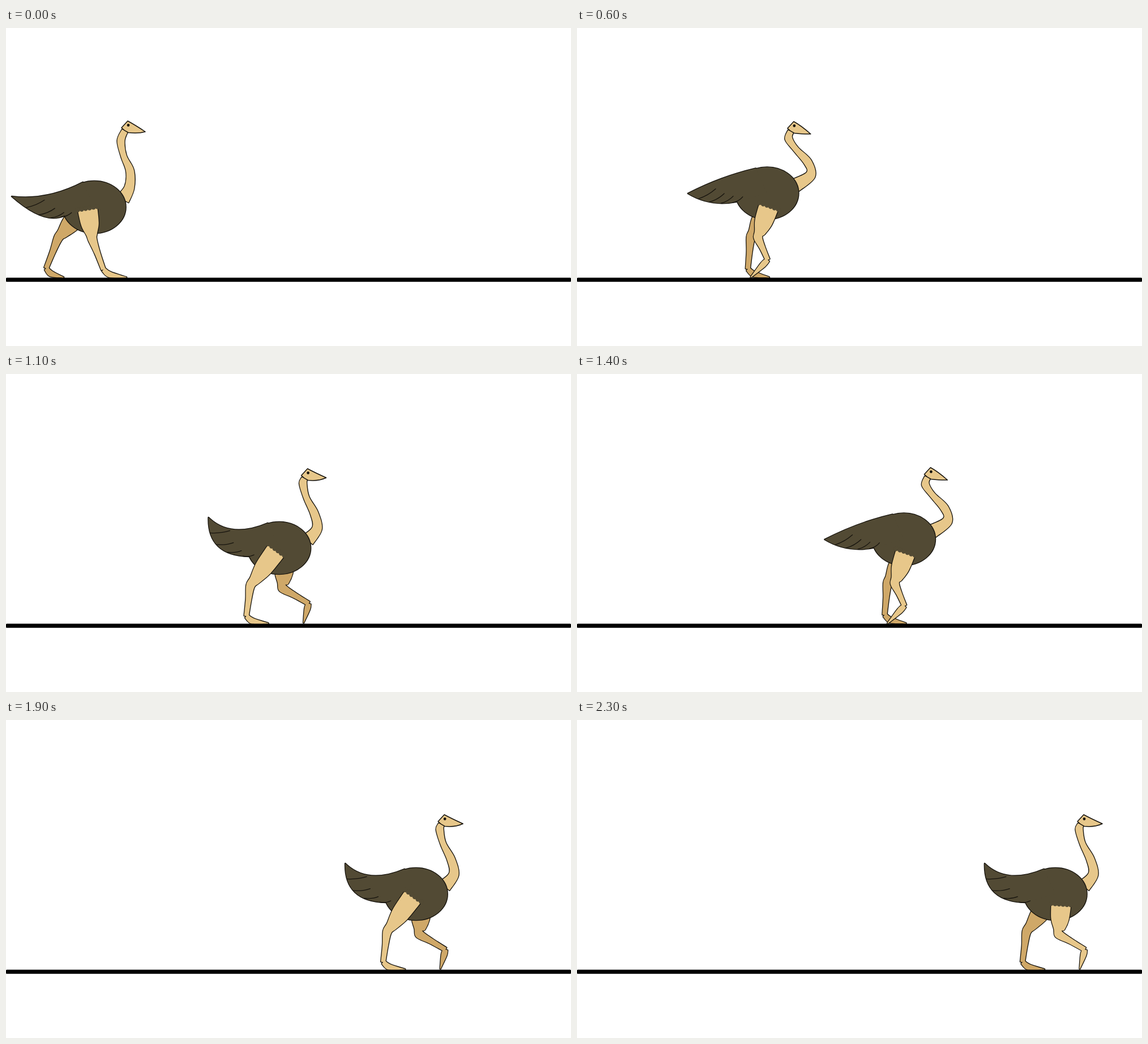
These frames come from a looping animation (998 by 561 pixels, 2.4 s). An HTML page:

```html
<!DOCTYPE html>
<html lang="en">
<head>
<meta charset="utf-8">
<title>Walking ostrich</title>
<style>
  html, body { margin: 0; width: 100%; height: 100%; overflow: hidden; background: #fff; }
  svg { display: block; width: 100vw; height: 100vh; }
  path { stroke-linecap: round; stroke-linejoin: round; }
</style>
</head>
<body>
<svg id="stage" viewBox="0 0 998 561"></svg>
<script>
const INK = '#17140e', SKIN = '#e7c78a', SHADE = '#cfa868', PLUME = '#524a34';
const FRAME = 100, FRAMES = 24, STRIDE = 120.8;
const BODY_RX = 55.5, BODY_RY = 46;
const NECK_WIDTHS = [11, 13, 10, 14, 17, 24];
const LEG_WIDTHS = [35, 31, 19, 15, 10, 8];
const FOOT_WIDTHS = [8, 10, 1];

// Joints: body centre; tail tip, upper and lower bend; crown and beak; neck bends;
// hip, knee, ankle and toe of each leg.
const contact = {
  body: [[156, 316]],
  tail: [[10, 297], [72, 305], [68, 348]],
  head: [[215, 164], [246, 183]],
  neck: [[203, 199], [208, 226], [219, 252], [218, 281]],
  front: [[144, 319], [153, 374], [172, 426], [213, 440]],
  rear: [[135, 321], [92, 371], [71, 424], [102, 440]]
};
const passing = {
  body: [[215, 291.5]],
  tail: [[75, 292], [133, 262], [115, 316]],
  head: [[262, 165], [292, 187]],
  neck: [[253, 195], [266, 214], [287, 237], [292, 259]],
  front: [[218, 315], [186, 370], [181, 425], [219, 440]],
  rear: [[218, 315], [199, 370], [216, 409], [186, 440]]
};
const high = {
  body: [[241, 307]],
  tail: [[116, 253], [155, 291], [114, 320]],
  head: [[291, 167], [324, 183]],
  neck: [[283, 193], [289, 218], [303, 246], [308, 272]],
  front: [[236, 311], [190, 374], [183, 427], [222, 440]],
  rear: [[251, 326], [247, 378], [293, 405], [284, 439]]
};

const lerp = (a, b, t) => [a[0] + (b[0] - a[0]) * t, a[1] + (b[1] - a[1]) * t];
const shift = (p, x, y) => [p[0] + x, p[1] + y];
const blend = (a, b) => Object.fromEntries(
  Object.keys(a).map(key => [key, a[key].map((p, i) => lerp(p, b[key][i], .5))]));

const poses = [contact, blend(contact, passing), passing, high];
const stage = document.getElementById('stage');

function add(parent, tag, attrs) {
  const el = document.createElementNS('http://www.w3.org/2000/svg', tag);
  for (const key in attrs) el.setAttribute(key, attrs[key]);
  return parent.appendChild(el);
}

// Smooth curve through points
function smooth(pts, start) {
  const at = i => pts[Math.max(0, Math.min(pts.length - 1, i))];
  const handle = (i, sign) => shift(at(i),
    sign * (at(i + 1)[0] - at(i - 1)[0]) / 6, sign * (at(i + 1)[1] - at(i - 1)[1]) / 6);
  let d = start + pts[0];
  for (let i = 1; i < pts.length; i++) d += `C${handle(i - 1, 1)} ${handle(i, -1)} ${pts[i]}`;
  return d;
}

// Points beside a spine, on the side given by the sign
function edge(spine, widths, sign) {
  return spine.map((p, i) => {
    const a = spine[Math.max(0, i - 1)], b = spine[Math.min(spine.length - 1, i + 1)];
    const dx = b[0] - a[0], dy = b[1] - a[1];
    const k = sign * widths[i] / 2 / Math.hypot(dx, dy);
    return shift(p, -dy * k, dx * k);
  });
}

const ribbon = (spine, widths) =>
  smooth(edge(spine, widths, 1), 'M') + smooth(edge(spine, widths, -1).reverse(), 'L') + 'Z';

// Several shapes with one common outline
function merged(g, shapes, fill) {
  shapes.forEach(d => add(g, 'path', { d, fill, stroke: INK, 'stroke-width': 2.6 }));
  shapes.forEach(d => add(g, 'path', { d, fill }));
}

function drawLeg(g, [hip, knee, ankle, toe], near) {
  const spine = [hip, lerp(hip, knee, .5), lerp(hip, knee, .83), knee, lerp(knee, ankle, .45), ankle];
  const planted = toe[0] > ankle[0];
  const ball = shift(lerp(ankle, toe, .28), 0, planted ? 5 : 0);
  merged(g, [ribbon(spine, LEG_WIDTHS), ribbon([ankle, ball, toe], FOOT_WIDTHS)],
    near ? SKIN : SHADE);
  if (!near) return;

  // plumage scallops over the thigh
  const [left] = edge(spine, LEG_WIDTHS, 1), [right] = edge(spine, LEG_WIDTHS, -1);
  for (let i = 0; i <= 5; i++) {
    const [cx, cy] = lerp(left, right, i / 5);
    add(g, 'circle', { cx, cy: cy - 1, r: 4.2, fill: PLUME });
  }
}

function drawHead(g, { body: [body], head: [crown, tip], neck }) {
  const spine = [shift(crown, -5, 17), ...neck, shift(body, 50, -14)];
  const nape = shift(crown, -11, 12), jaw = shift(crown, 1, 20.5);
  const face = `M${nape}L${crown}Q${shift(crown, 13, 7)} ${tip}` +
    `Q${shift(jaw, 18, 2)} ${jaw}Q${shift(jaw, -7, -3)} ${nape}Z`;
  merged(g, [ribbon(spine, NECK_WIDTHS)], SKIN);
  add(g, 'path', { d: face, fill: SKIN, stroke: INK, 'stroke-width': 1.5 });
  add(g, 'circle', { cx: crown[0] + 1, cy: crown[1] + 7.5, r: 2.4, fill: INK });
}

function drawBody(g, { body: [body], tail: [tip, upper, lower] }) {
  const top = shift(body, -20, -44), root = shift(body, -53, 15);
  const oval = `M${shift(body, -BODY_RX, 0)}a${BODY_RX} ${BODY_RY} 0 1 1 ${2 * BODY_RX} 0` +
    `a${BODY_RX} ${BODY_RY} 0 1 1 ${-2 * BODY_RX} 0Z`;
  merged(g, [oval, `M${tip}Q${upper} ${top}L${body}L${root}Q${lower} ${tip}Z`], PLUME);

  // feather lines rise from the lower edge of the tail
  const angle = Math.atan2(body[1] - tip[1], body[0] - tip[0]) - .52;
  for (let i = 0; i < 4; i++) {
    const t = .08 + i * .23, length = 20 + i * 5;
    const from = lerp(lerp(root, lower, t), lerp(lower, tip, t), t);
    const to = shift(from, length * Math.cos(angle), length * Math.sin(angle));
    const bend = shift(lerp(from, to, .5), 2, 3);
    add(g, 'path', { d: `M${from}Q${bend} ${to}`, fill: 'none', stroke: INK, 'stroke-width': 1.3 });
  }
}

function drawBird(pose, frontNear) {
  const g = add(stage, 'g', { visibility: 'hidden' });
  drawLeg(g, frontNear ? pose.rear : pose.front, false);
  drawHead(g, pose);
  drawBody(g, pose);
  drawLeg(g, frontNear ? pose.front : pose.rear, true);
  return g;
}

// Two steps make a cycle; the legs swap sides on the second
const birds = Array.from({ length: 8 }, (_, i) => drawBird(poses[i % 4], i < 4));
add(stage, 'rect', { x: 0, y: 440.4, width: 998, height: 7.4, rx: 1.5 });

let shown = birds[0];
function tick() {
  const frame = Math.floor(performance.now() / FRAME) % FRAMES;
  shown.setAttribute('visibility', 'hidden');
  shown = birds[frame % 8];
  shown.setAttribute('transform', `translate(${Math.floor(frame / 4) * STRIDE} 0)`);
  shown.setAttribute('visibility', 'visible');
  requestAnimationFrame(tick);
}
tick();
</script>
</body>
</html>
```
